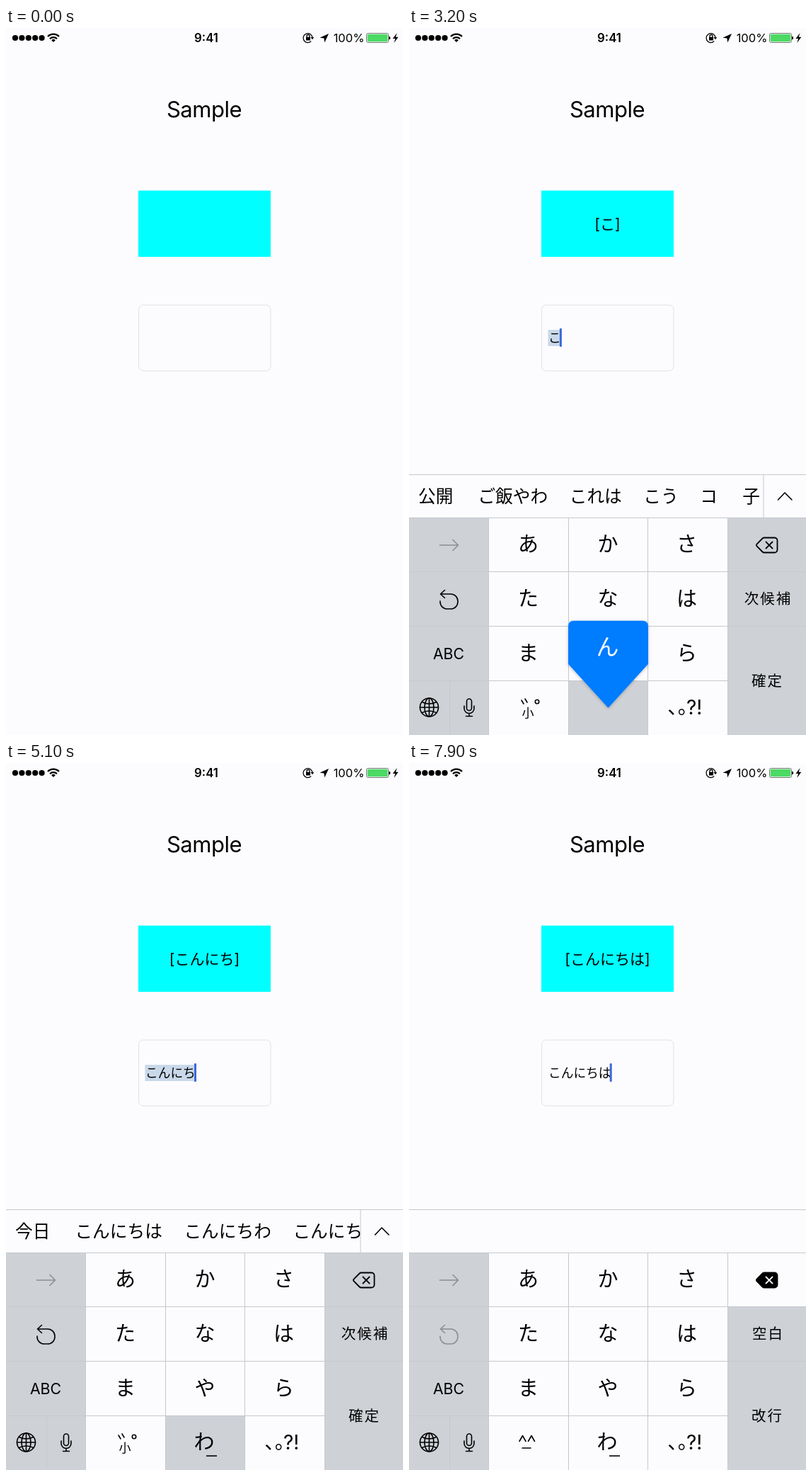
Animation of 561x998 px, one loop 8000 ms. Source, as an HTML page:

```html
<!DOCTYPE html>
<html lang="ja">
<head>
<meta charset="utf-8">
<title>Kana input</title>
<style>
html, body { margin: 0; width: 100%; height: 100%; overflow: hidden; background: #fcfcfe; }
svg { display: block; width: 561px; height: 998px; font-family: Inter, "Noto Sans CJK JP", sans-serif; }
.line { fill: none; stroke: #000; stroke-width: 1.6; stroke-linecap: round; stroke-linejoin: round; }
.off { stroke: #8b8f93; }
.grid { fill: none; stroke: #c6c8ce; stroke-width: 1; }
</style>
</head>
<body>
<svg id="stage" viewBox="0 0 561 998">
  <defs>
    <clipPath id="barClip"><rect x="0" y="632" width="501" height="59"/></clipPath>
    <filter id="soft" x="-20%" y="-20%" width="140%" height="140%">
      <feDropShadow dx="0" dy="1" stdDeviation="2" flood-opacity=".25"/>
    </filter>
  </defs>
  <rect width="561" height="998" fill="#fcfcfe"/>
  <g id="status">
    <g id="signal"></g>
    <path d="M64.2 17.2L67 20l2.8-2.8a4 4 0 0 0-5.6 0z"/>
    <path class="line" style="stroke-width:2.2;stroke-linecap:butt" d="M62 15.2a7 7 0 0 1 10 0M59 12a11.3 11.3 0 0 1 16 0"/>
    <text x="283" y="20" font-size="16.8" font-weight="600" text-anchor="middle">9:41</text>
    <path class="line" style="stroke-width:1.3" d="M433 14a6.5 6.5 0 1 0-2.2 5M425 13v-1.5a2 2 0 0 1 4 0V13"/>
    <path d="M430.5 13h4.8l-2.4 3.2zM424 12.7h6v4.8h-6z"/>
    <path d="M456 8l-5.8 12.5-.8-6-6-.7z"/>
    <text x="484.5" y="20" font-size="16.5" text-anchor="middle">100%</text>
    <rect x="509.5" y="7.5" width="31" height="13" rx="2" fill="#fcfcfe" stroke="#777"/>
    <rect x="510.7" y="8.7" width="28.6" height="10.6" rx="1" fill="#4cd964"/>
    <path d="M541.2 11.5q2 .5 2 2.5t-2 2.5z"/>
    <path d="M552.5 7l-6 8h3.6l-1.8 6 6-8.2h-3.6z"/>
  </g>
  <text x="280" y="126" font-size="31" letter-spacing="-.5" text-anchor="middle">Sample</text>
  <rect x="187" y="229.5" width="187" height="93.5" fill="#0ff"/>
  <rect x="187.5" y="391" width="186.5" height="93" rx="6.5" fill="none" stroke="#e2e2e0"/>
  <g id="live"></g>
</svg>
<script>
const LOOP = 8000;
const GREY = '#ced1d6', PAPER = '#fcfcfe';
const COLS = [0, 113, 225, 338, 450, 561];
const ROWS = [691, 767.5, 844.5, 921.5, 998];
const KANA = ['あかさ', 'たなは', 'まやら'];

// Each entry changes only the listed properties from its time on.
const EVENTS = [
  [0, { text: '', field: false, composing: false, bar: false, list: [], press: '', flick: null, arrow: false }],
  [1400, { field: true }],
  [2300, { press: 'か' }],
  [2400, { flick: ['こ', 0, 1] }],
  [2700, { press: '', flick: null, text: 'こ', composing: true, bar: true, list: ['公開', 'ご飯やわ', 'これは', 'こう', 'コ', '子'] }],
  [3000, { press: 'わ' }],
  [3100, { flick: ['ん', 0, -1] }],
  [3300, { press: '', flick: null, text: 'こん', list: ['今', 'こん', 'コン', '今度', '婚', '根'] }],
  [3400, { press: 'な' }],
  [3500, { flick: ['に', -1, 0] }],
  [3700, { press: '', flick: null, text: 'こんに', list: ['今日', 'こんにちは', 'コンに', 'こんに', 'コンニ'] }],
  [4100, { press: 'た' }],
  [4200, { flick: ['ち', -1, 0] }],
  [4500, { press: '', flick: null, text: 'こんにち', list: ['今日', 'こんにちは', 'こんにちわ', 'こんにち'] }],
  [5000, { press: 'わ' }],
  [5300, { press: '' }],
  [5900, { press: 'は' }],
  [6000, { text: 'こんにちは', arrow: true }],
  [6200, { press: '' }],
  [6900, { press: 'enter' }],
  [7100, { press: '', composing: false, list: [], arrow: false }],
  [7800, { press: 'delete' }]
];

const live = document.getElementById('live');
document.getElementById('signal').innerHTML =
  [0, 1, 2, 3, 4].map(i => `<circle cx="${13 + i * 9.4}" cy="14" r="4.1"/>`).join('');

// y is the optical middle of the glyphs
const label = (s, x, y, size, attrs = '') =>
  `<text x="${x}" y="${y + size * .375}" font-size="${size}" text-anchor="middle" ${attrs}>${s}</text>`;
const box = (x, y, x2, y2, fill) =>
  `<rect x="${x}" y="${y}" width="${x2 - x}" height="${y2 - y}" fill="${fill}"/>`;
const line = (d, cls = '') => `<path class="line ${cls}" d="${d}"/>`;

function field(s) {
  const end = 196.7 + 17.7 * s.text.length;
  let out = s.text ? label(`[${s.text}]`, 280.5, 276, 21) : '';
  if (s.composing) out += box(196.5, 426, end, 449, '#c9d9ea');
  out += `<text x="197" y="443.5" font-size="17.7">${s.text}</text>`;
  if (s.field) out += `<rect x="${Math.max(end, 198) - 1.5}" y="424" width="3" height="26" rx="1" fill="#3d68d8"/>`;
  return out;
}

function bar(s) {
  if (!s.bar) return '';
  let out = box(0, 631, 561, 691, PAPER) + '<path class="grid" d="M0 630.5H561"/>';
  if (!s.list.length) return out;
  let x = 13;
  const words = s.list.map((w, i) => {
    const word = `<text x="${x}" y="670" font-size="24.7">${w}</text>`;
    x = i ? x + Math.max(60, w.length * 24.7 + 30.5) : Math.max(97, x + w.length * 24.7 + 35);
    return word;
  });
  return out + `<g clip-path="url(#barClip)">${words.join('')}</g>`
    + '<path class="grid" d="M501 631V691"/>' + line('M521.5 666l9.5-10 10 10');
}

function kanaKeys(s) {
  let out = '';
  const cell = (c, r, name, art) => {
    const down = s.press === name;
    if (down) out += box(COLS[c], ROWS[r], COLS[c + 1], ROWS[r + 1], GREY);
    if (!down || !s.flick) out += art;
  };
  KANA.forEach((row, r) => [...row].forEach((k, i) =>
    cell(i + 1, r, k, label(k, [168.5, 281, 392.5][i], 728 + r * 77, 29))));
  cell(2, 3, 'わ', label('わ', 280, 958, 29) + '<path d="M283 977.3h15v1.6h-15z"/>');
  out += s.composing
    ? line('M159 949l3 5M164 947l3 5') + '<circle class="line" cx="181" cy="951" r="2.7"/>' + label('小', 168, 967, 17)
    : line('M156 957.5l4.5-8 4.5 8M168.500 957.500l4.500-8 4.500 8M160 967h12');
  return out + '<text x="366" y="968" font-size="28">､｡</text><text x="392" y="969" font-size="28">?!</text>';
}

function sideKeys(s) {
  const del = s.press === 'delete', enter = s.press === 'enter';
  const shape = 'M502 719.500h14.500a4 4 0 0 1 4 4v13a4 4 0 0 1-4 4H502q-1.500 0-2.500-1l-8-8q-1.300-1.500 0-3l8-8q1-1 2.500-1z';
  const wide = 'letter-spacing="2"';
  let out = '';
  if (del) out += box(450, 691, 561, 767.5, PAPER);
  if (enter) out += box(450, 844.5, 561, 998, PAPER);
  out += `<path d="${shape}" fill="${del ? '#000' : 'none'}" stroke="#000" stroke-width="1.8"/>`;
  out += `<path d="M504.500 725.500l9 9m0-9l-9 9" stroke="${del ? '#fff' : '#000'}" stroke-width="1.8" stroke-linecap="round"/>`;
  out += label(s.composing ? '次候補' : '空白', 507.5, 805.5, 20.5, wide);
  out += label(s.composing ? '確定' : '改行', 506.5, 921, 20.5, wide);
  out += line('M43.500 730H69.500M62 722.500l7.500 7.500-7.500 7.500', s.arrow ? '' : 'off');
  out += line('M50.500 793.500l-6 5.500 6 5.500M44.500 799H59a10 10 0 0 1 10 10v1a10 10 0 0 1-10 10h-5a10 10 0 0 1-10-10v-1', s.composing ? '' : 'off');
  out += label('ABC', 56, 883, 21.3);
  out += line('M15.500 959h26M28.500 946v26M18.500 951.500q10 5 20 0M18.500 966.500q10-5 20 0')
    + '<circle class="line" cx="28.500" cy="959" r="13"/><ellipse class="line" cx="28.500" cy="959" rx="6.500" ry="13"/>';
  out += '<rect class="line" x="81.500" y="947" width="7" height="16.500" rx="3.500"/>'
    + line('M78 957v3.500a7 7 0 0 0 14 0V957M85 967.500V971M80.500 971.500h9');
  return out;
}

function bubble(s) {
  if (!s.flick) return '';
  const [k, dx, dy] = s.flick;
  const row = KANA.findIndex(r => r.includes(s.press));
  const r = row < 0 ? 3 : row;
  const c = row < 0 ? 2 : KANA[row].indexOf(s.press) + 1;
  const x = (COLS[c] + COLS[c + 1]) / 2, y = (ROWS[r] + ROWS[r + 1]) / 2;
  // Drawn pointing down at the key centre, then turned toward the flick.
  const half = dx ? 38.5 : 56.5, far = dx ? 177 : 123, near = dx ? 76 : 62;
  const turn = dx ? dx * 90 : dy > 0 ? 180 : 0;
  const d = `M0 0L${-half} ${-near}V${8 - far}q0-8 8-8H${half - 8}q8 0 8 8V${-near}z`;
  return `<g filter="url(#soft)"><path d="${d}" fill="#057cff" transform="translate(${x} ${y}) rotate(${turn})"/></g>`
    + label(k, x + dx * 118 - 1, y + dy * 87, 32, 'fill="#fff"');
}

function keyboard(s, shift) {
  return `<g transform="translate(0 ${shift})">`
    + box(0, 691, 561, 998, PAPER) + box(0, 691, 113, 998, GREY) + box(450, 691, 561, 998, GREY)
    + kanaKeys(s) + sideKeys(s)
    + '<path class="grid" d="M0 691.500H561M0 767.500H561M0 844.500H450M0 921.500H450M112.500 691V998M225.500 691V998M337.500 691V998M450.500 691V998M57.500 922V998M450 844.500H561"/>'
    + bubble(s) + '</g>';
}

let last = '';
function draw(now) {
  const t = now % LOOP;
  const s = Object.assign({}, ...EVENTS.filter(e => e[0] <= t).map(e => e[1]));
  const p = Math.min(1, Math.max(0, (t - 1400) / 400));
  const shift = 307 * (1 - p) ** 3;
  const html = field(s) + bar(s) + (p ? keyboard(s, shift) : '');
  if (html !== last) live.innerHTML = last = html;
  requestAnimationFrame(draw);
}
draw(0);
</script>
</body>
</html>
```
